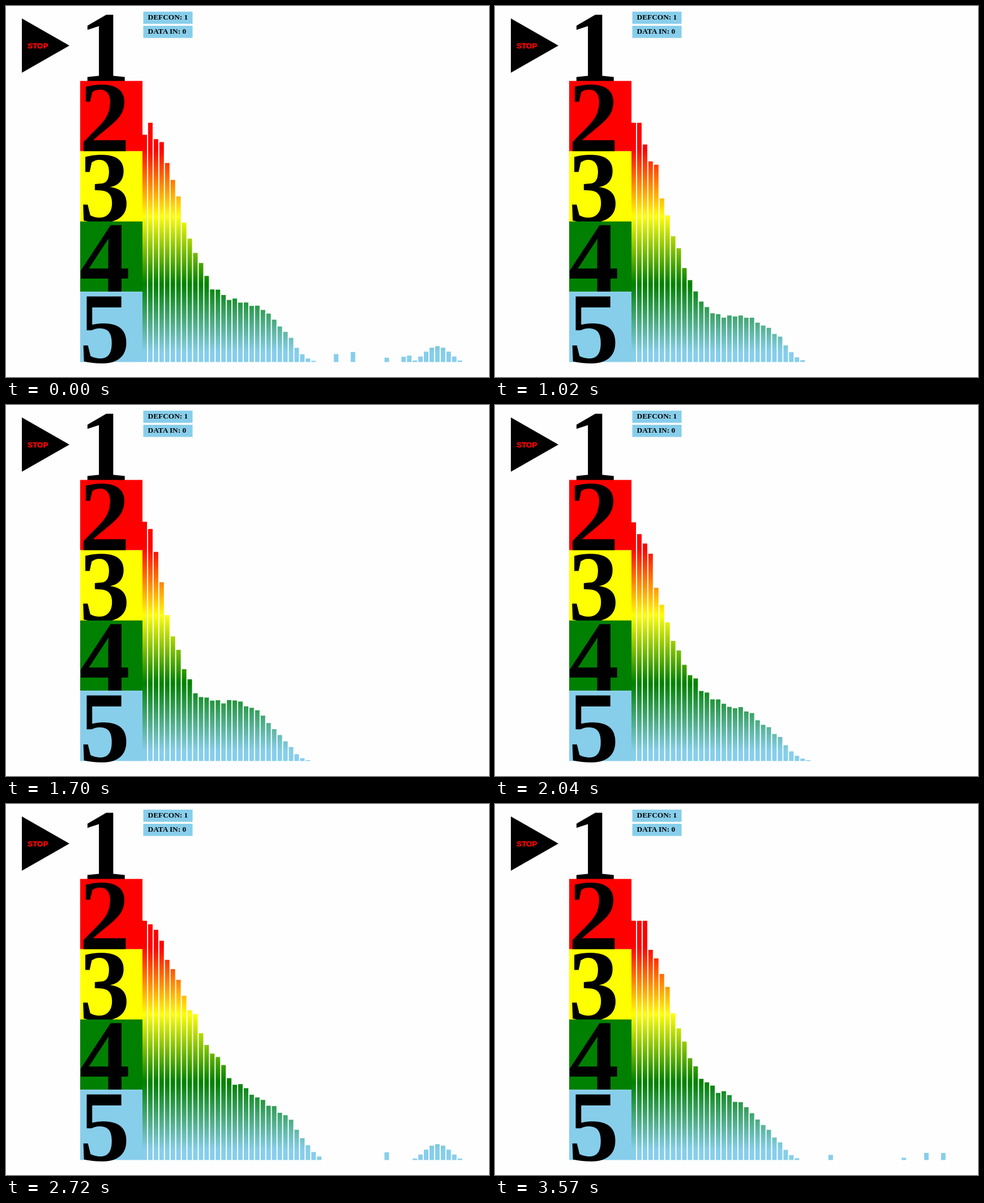
Animation, 853 px wide and 656 px high, one loop 3.74 s. Source, as an HTML page with a canvas:

```html
<!DOCTYPE html>
<html lang="en">
<head>
<meta charset="utf-8">
<title>Defcon spectrum</title>
<style>
  html, body { margin: 0; width: 100%; height: 100%; overflow: hidden; background: #fefefe; }
  svg, canvas { position: absolute; left: 0; top: 0; display: block; }
  text { font-weight: bold; white-space: pre; }
  .digit { font-family: "Liberation Serif", "Times New Roman", serif; font-size: 179px; }
  .label { font-family: "Liberation Serif", "Times New Roman", serif; font-size: 13.333px; }
  .stop { font-family: "Liberation Sans", Arial, sans-serif; font-size: 13.333px; fill: red; stroke: red; stroke-width: .5; }
</style>
</head>
<body>
<svg id="panel" width="853" height="656" viewBox="0 0 853 656">
  <path d="M28 22L112 70L28 118Z"/>
  <text class="stop" x="38.3" y="74.6">STOP</text>
</svg>
<canvas id="bars" width="853" height="656"></canvas>
<script>
const STEP = 170, STEPS = 22;
const LEFT = 241, PITCH = 9.94, BAR = 8, FLOOR = 629.5, COUNT = 57;
const PEAK = 423, LAST_BASS = 32;
const SKY = '#87ceeb';

// spread and curve shape the fall-off, hump sits on its foot, burst is the treble.
const POSES = [
  { step: 0, spread: 10, curve: 1.7, hump: { at: 20, height: 80 }, burst: 28 },
  { step: 3, spread: 8.9, curve: 1.25, hump: { at: 18, height: 25 }, burst: 0 },
  { step: 6, spread: 9.2, curve: 1.6, hump: { at: 21, height: 65 }, burst: 0 },
  { step: 10, spread: 7, curve: 1.2, hump: { at: 18, height: 80 }, burst: 0 },
  { step: 14, spread: 11.6, curve: 1.6, hump: { at: 23, height: 55 }, burst: 95 },
  { step: 16, spread: 13.8, curve: 1.3, hump: { at: 24, height: 30 }, burst: 28 },
  { step: 21, spread: 10.4, curve: 1.65, hump: { at: 19, height: 70 }, burst: 0 }
];
POSES.push({ ...POSES[0], step: STEPS });

const mix = (a, b, t) => a + (b - a) * t;
const clamp = v => Math.max(0, Math.min(1, v));

function random(a, b) {
  const v = Math.sin(a * 12.9898 + b * 78.233) * 43758.5453;
  return v - Math.floor(v);
}

// A smooth bump that is exactly zero beyond its half width.
function bump(distance, halfWidth) {
  return Math.cos(clamp(Math.abs(distance) / halfWidth) * Math.PI / 2) ** 2;
}

function bass({ spread, curve, hump }, bar) {
  const slope = 440 * Math.exp(-((bar / spread) ** curve));
  const foot = hump.height * bump(bar - hump.at, 12);
  return Math.min(PEAK, slope + foot) * clamp((LAST_BASS - bar) / 6);
}

function treble({ burst }, bar, step) {
  const spark = random(bar, step + 40) < .15 ? 18 * random(bar, step + 80) : 0;
  return Math.max(spark, burst * bump(bar - 52, 5));
}

function heightAt(step, bar) {
  const k = POSES.findIndex(pose => pose.step > step);
  const a = POSES[k - 1], b = POSES[k];
  const t = (step - a.step) / (b.step - a.step);
  const level = part => mix(part(a, bar, step), part(b, bar, step), t);

  if (bar < LAST_BASS) return Math.min(PEAK, level(bass) * mix(.95, 1.05, random(bar, step)));
  const loud = step === 0 || step >= 13;
  return loud ? level(treble) : 0;
}

function add(tag, attrs, text = '') {
  const node = document.createElementNS(panel.namespaceURI, tag);
  for (const name in attrs) node.setAttribute(name, attrs[name]);
  node.textContent = text;
  panel.append(node);
}

const panel = document.getElementById('panel');
['none', 'red', 'yellow', 'green', SKY].forEach((fill, i) => {
  const height = 124.25, y = 8.25 + i * height;
  add('rect', { x: 131, y, width: 110, height, fill });
  add('text', { class: 'digit', x: 129.5, y: y + height }, i + 1);
});
['DEFCON: 1', 'DATA IN: 0'].forEach((label, i) => {
  const y = 10 + i * 25;
  add('rect', { x: 242.5, y, width: 87, height: 21.5, fill: SKY });
  add('text', { class: 'label', x: 250.5, y: y + 14.2 }, label);
});

const ctx = document.getElementById('bars').getContext('2d');
const heat = ctx.createLinearGradient(0, 252, 0, 612);
['red', 'yellow', 'green', SKY].forEach((color, i) => heat.addColorStop(i / 3, color));
ctx.fillStyle = heat;

let shown = -1;
function draw(now) {
  const step = Math.floor(now / STEP) % STEPS;
  if (step === shown) return;
  shown = step;
  ctx.clearRect(0, 0, 853, 656);
  for (let bar = 0; bar < COUNT; bar++) {
    const height = heightAt(step, bar);
    if (height >= 1) ctx.fillRect(LEFT + bar * PITCH, FLOOR - height, BAR, height);
  }
}

const start = performance.now();
function tick() {
  draw(performance.now() - start);
  requestAnimationFrame(tick);
}
tick();
</script>
</body>
</html>
```
